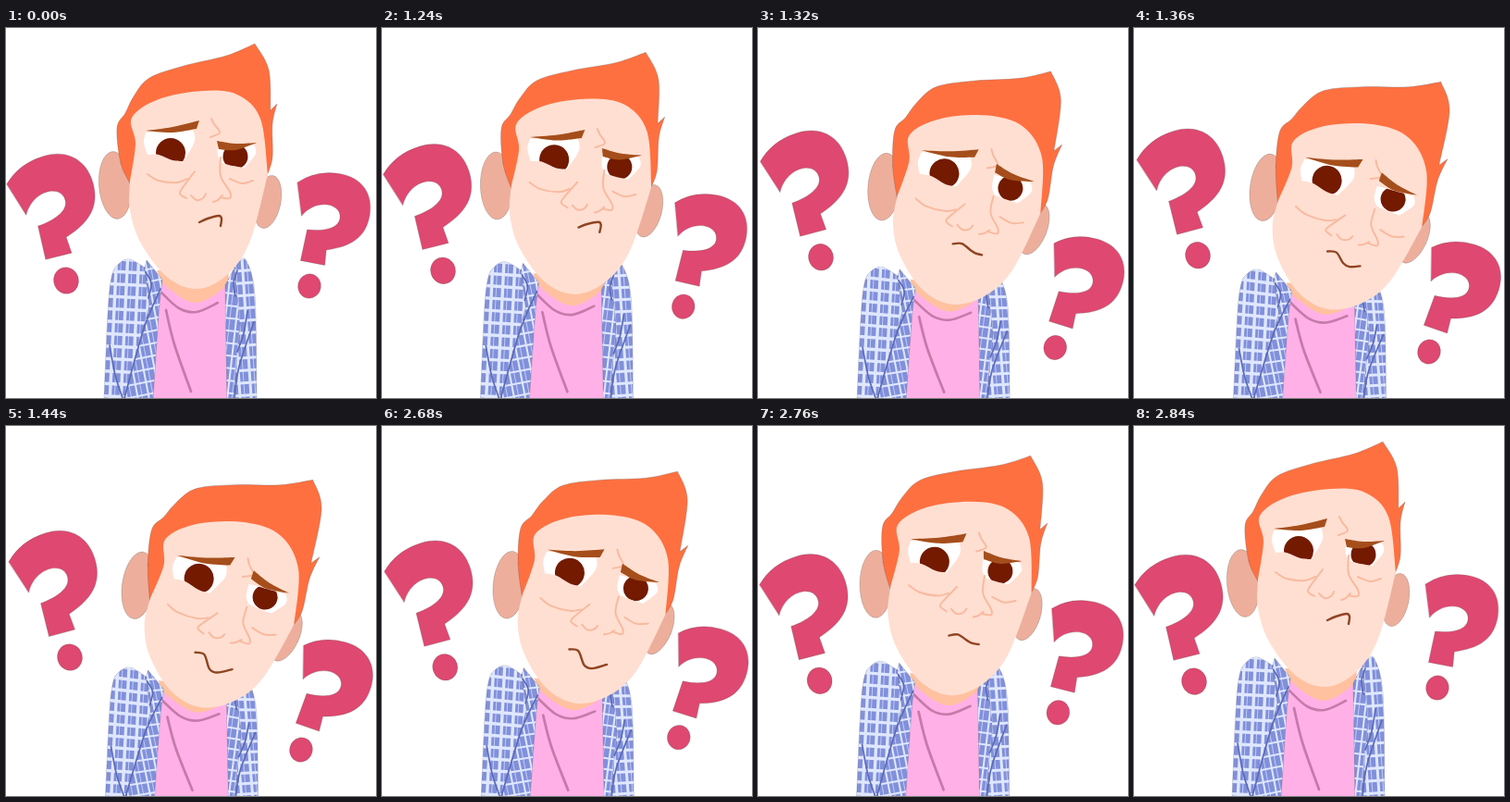
Write an HTML page with a canvas that moves like this. It is 400 px wide and 400 px high and loops after 2880 ms.

```html
<!DOCTYPE html>
<html lang="en">
<head>
<meta charset="utf-8">
<title>Puzzled</title>
<style>
  html, body { margin: 0; width: 100%; height: 100%; overflow: hidden; background: #fff; }
  canvas { display: block; width: 100vmin; height: 100vmin; }
</style>
</head>
<body>
<canvas id="stage"></canvas>
<script>
const canvas = document.getElementById('stage');
const ctx = canvas.getContext('2d');
const LOOP = 2880, STEP = 40, LEAN_AT = 1240, RETURN_AT = 2680;
const C = {
  hair: '#ff7040', skin: '#ffdfd2', ear: '#edaf9c', neck: '#ffc19f', crease: '#f8ba9f',
  brow: '#a54e1b', pupil: '#731a00', mouth: '#8f4421', tee: '#ffb1e7', fold: '#c67aaa',
  plaid: '#8190da', stripe: '#dfe7ff', seam: '#5c6ab8', mark: '#df4870', edge: 'rgba(95,85,85,.45)'
};

const clamp = v => Math.max(0, Math.min(1, v));
const lerp = (a, b, k) => a + (b - a) * k;
const rad = degrees => degrees * Math.PI / 180;

// "x,y x,y! ..." where ! marks a corner (stored twice)
function pts(text) {
  return text.split(' ').flatMap(word => {
    const p = word.replace('!', '').split(',').map(Number);
    return word.endsWith('!') ? [p, p] : [p];
  });
}

// Smooth curve through the points
function trace(list, closed) {
  const n = list.length;
  const at = i => closed ? list[(i + n) % n] : list[Math.max(0, Math.min(n - 1, i))];
  ctx.beginPath();
  ctx.moveTo(...list[0]);
  for (let i = 0; i < (closed ? n : n - 1); i++) {
    const a = at(i - 1), b = at(i), c = at(i + 1), d = at(i + 2);
    if (b[0] === c[0] && b[1] === c[1]) continue;
    ctx.bezierCurveTo(
      b[0] + (c[0] - a[0]) / 6, b[1] + (c[1] - a[1]) / 6,
      c[0] - (d[0] - b[0]) / 6, c[1] - (d[1] - b[1]) / 6, c[0], c[1]);
  }
  if (closed) ctx.closePath();
}

function paint(color, outlined, path) {
  ctx.fillStyle = color;
  path ? ctx.fill(path) : ctx.fill();
  if (!outlined) return;
  ctx.strokeStyle = C.edge;
  ctx.lineWidth = .6;
  path ? ctx.stroke(path) : ctx.stroke();
}

function shape(list, color, outlined) {
  trace(list, true);
  paint(color, outlined);
}

function line(list, color, width) {
  trace(list, false);
  ctx.strokeStyle = color;
  ctx.lineWidth = width;
  ctx.stroke();
}

function oval(x, y, rx, ry, turn, color, outlined) {
  ctx.beginPath();
  ctx.ellipse(x, y, rx, ry, turn, 0, 7);
  paint(color, outlined);
}

// All head parts in the upright pose
const head = {
  crown: pts('124,146 120,108 129,92 138,74 155,54 192,41 238,30 269,17!'),
  side: pts('284,45 286,89! 293,82! 288,104 288,140 282,160! 210,200! 134,168!'),
  face: pts('134,166! 140,125 136,97 165,77 212,68 250,72 275,98 283,158! 264,230 240,266 208,282 175,270 146,233 134,197'),
  eyes: [
    { white: pts('151,113! 149,124 153,137! 165,137 180,143 192,144! 204,122 201,107!'), pupil: pts('178,135'), r: 16 },
    { white: pts('229,124! 229,138 233,146! 245,149 258,151! 270,136 268,126!'), pupil: pts('248,139'), r: 13.5 }
  ],
  leftBrow: pts('151,111! 180,107 209,100! 206,109! 180,113'),
  rightBrow: pts('228,122! 230,131! 248,132 271,124! 248,125'),
  frown: pts('222,98 225,104 231,113 221,118'),
  creases: [
    '204,155 192,171 188,179 195,184', '200,181 206,186 213,184 216,179',
    '232,140 232,160 242,177 242,184 232,183', '224,188 229,186 234,181',
    '153,158 165,165 185,167 196,163', '242,163 255,168 267,165'
  ].map(pts),
  mouth: pts('209,210 218,206 230,203 233,206 232,214'),
  sadMouth: pts('194,227 204,227 213,241 222,243 237,236')
};

function drawHead(tilt, mood) {
  // Leaning widens the head to the right and lowers the middle of the face
  const widen = ([x, y]) => [x + .06 * (x - 140) * tilt, y];
  const nod = (list, gain = 1) => list.map(p => {
    const [x, y] = widen(p);
    return [x, y + 18 * gain * tilt * Math.sin(Math.PI * Math.sqrt(clamp((y - 60) / 235)))];
  });

  ctx.save();
  ctx.translate(lerp(201, 222, tilt), lerp(179, 199.5, tilt));
  ctx.rotate(rad(12.8) * tilt);
  ctx.translate(-201, -179);

  oval(118, 170, 17.5, 36.5, -.08, C.ear, true);
  oval(283 + 3 * tilt, 188, 14, 29, .2, C.ear, true);
  shape([...head.crown.map(widen), ...nod(head.side)], C.hair, true);
  shape(nod(head.face), C.skin);

  for (const eye of head.eyes) {
    ctx.save();
    trace(nod(eye.white), true);
    paint('#fff');
    ctx.clip();
    oval(...nod(eye.pupil, .75)[0], eye.r, eye.r, 0, C.pupil);
    ctx.restore();
  }
  for (const c of head.creases) line(nod(c, 1.55), C.crease, 2);
  line(nod(head.frown), C.crease, 2);
  shape(nod(head.leftBrow), C.brow);

  // The right brow swings up around its outer end
  const [cos, sin] = [Math.cos(rad(18) * tilt), Math.sin(rad(18) * tilt)];
  const swung = head.rightBrow.map(([x, y]) => [
    271 + (x - 271) * cos - (y - 124) * sin, 124 + (x - 271) * sin + (y - 124) * cos]);
  shape(nod(swung), C.brow);

  line(head.mouth.map(([x, y], i) => [
    lerp(x, head.sadMouth[i][0], mood), lerp(y, head.sadMouth[i][1], mood)]), C.mouth, 2.4);
  ctx.restore();
}

const shirt = {
  tee: pts('164,270! 241,270! 246,402! 155,402!'),
  neck: pts('163,262! 241,262! 236,280 205,297 174,280'),
  collar: pts('167,285 187,303 206,307 229,297'),
  crease: pts('173,305 182,342 200,393'),
  seams: ['167,282 149,325 128,400', '112,343 118,375 126,400', '151,264 157,276 154,292',
          '268,318 252,366 247,400', '261,306 257,330 250,350', '250,262 246,276 248,290'].map(pts),
  // outline, stripe slope, stripe width
  panels: [
    [pts('106,402! 110,310 114,270 121,256 133,250 150,259! 155,300 136,402!'), .05, 3.4],
    [pts('150,259! 152,251! 169,272! 165,310 159,402! 128,402! 155,300!'), -.2, 2],
    [pts('239,402! 237,278! 247,259! 253,320 247,402!'), .12, 2],
    [pts('247,259! 252,252 260,252 269,290 271,402! 246,402! 253,320!'), -.07, 3]
  ]
};

function drawBody(tilt) {
  // Shoulders sink as the head leans, the right one most
  const sink = list => list.map(([x, y]) =>
    [x + 1.5 * tilt, y + tilt * (400 - y) / 150 * (11 + (x - 130) / 10)]);
  shape(sink(shirt.tee), C.tee);
  shape(sink(shirt.neck), C.neck);
  line(sink(shirt.collar), C.fold, 2.6);
  line(sink(shirt.crease), C.fold, 2.8);

  for (const [outline, slope, width] of shirt.panels) {
    ctx.save();
    trace(sink(outline), true);
    paint(C.plaid, true);
    ctx.clip();
    for (let i = 0; i < 16; i++) {
      const x = 92 + i * 12, y = 240 + i * 13.5;
      line(sink([[100, y - slope * 90], [280, y + slope * 90]]), C.stripe, width);
      line(sink([[x + slope * 75, 245], [x - slope * 75, 402]]), C.stripe, width);
      line(sink([[x + 5 + slope * 75, 245], [x + 5 - slope * 75, 402]]), C.stripe, .7);
    }
    ctx.restore();
  }
  for (const s of shirt.seams) line(sink(s), C.seam, 1.7);
}

// Question mark with its dot at the origin
const hook = new Path2D('M-33-118Q-14-136 14-136C42-136 57-118 57-94C57-66 40-53 13-45' +
  'L14-27L-15-28L-13-65C6-66 23-72 23-84C23-102-8-104-22-80Z');

function drawMark(x, y, degrees, size) {
  ctx.save();
  ctx.translate(x, y);
  ctx.rotate(rad(degrees));
  ctx.scale(size, size);
  paint(C.mark, true, hook);
  oval(0, 0, 13.4, 14.4, 0, C.mark, true);
  ctx.restore();
}

function draw(ms) {
  // Motion runs in whole steps: lean over, hold, come back
  const count = from => Math.floor((ms - from) / STEP) + 1;
  const go = count(LEAN_AT), back = count(RETURN_AT);
  const swing = (out, home, delay = 0) => clamp((go - delay) / out) - clamp((back - delay) / home);
  const hop = k => clamp(k / 6) + .6 * Math.sin(Math.PI * clamp(k / 6));
  const tilt = swing(4, 5);

  const scale = canvas.width / 400;
  ctx.setTransform(scale, 0, 0, scale, 0, 0);
  ctx.fillStyle = '#fff';
  ctx.fillRect(0, 0, 400, 400);
  ctx.lineCap = ctx.lineJoin = 'round';
  drawMark(65 + 4 * tilt, 273 - 23 * (hop(go) - hop(back)), -16 - tilt, 1);
  drawMark(328 - 9 * tilt, 279 + 71 * swing(3.2, 5.3), 9 + 8 * tilt, .92);
  drawBody(tilt);
  drawHead(tilt, swing(4, 4, 1));
}

function resize() {
  const side = Math.min(innerWidth, innerHeight) || 400;
  canvas.width = canvas.height = Math.round(side * (devicePixelRatio || 1));
}

const start = performance.now();
function tick() {
  draw((performance.now() - start) % LOOP);
  requestAnimationFrame(tick);
}
addEventListener('resize', resize);
resize();
tick();
</script>
</body>
</html>
```
